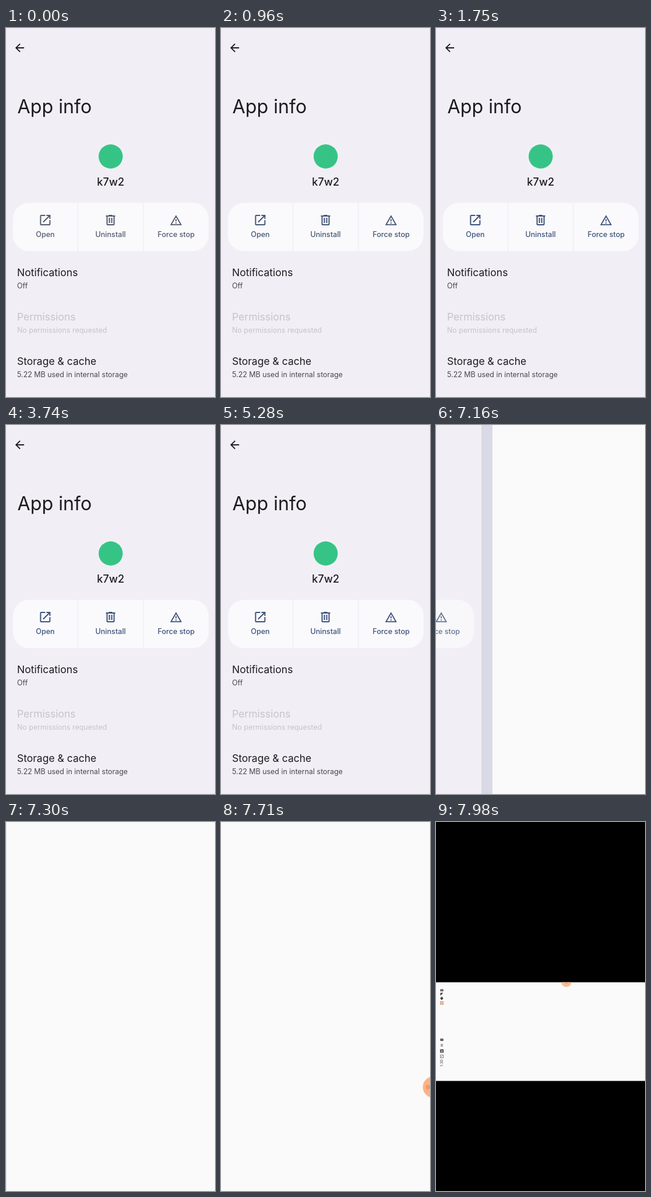
An HTML page for the animation above (8 s loop, 359x632 px).

```html
<!DOCTYPE html>
<html lang="en">
<head>
<meta charset="utf-8">
<title>App info</title>
<style>
  html, body { margin: 0; width: 100%; height: 100%; overflow: hidden; background: #f1eff5; }
  svg { display: block; width: 359px; height: 632px; font-family: Inter, Roboto, sans-serif; }
  .row { font-size: 17.5px; fill: #1b1b20; }
  .note { font-size: 12.45px; fill: #48484e; }
  .off { fill: #c5c4ca; }
  .button { font-size: 12.6px; font-weight: 500; text-anchor: middle; }
</style>
</head>
<body>
<svg viewBox="0 0 359 632">
  <g id="portrait">
    <rect width="359" height="632" fill="#f1eff5"/>
    <g id="page">
      <path transform="translate(12.1 22.6) scale(.95)" fill="#1b1b20"
        d="M20 11H7.83l5.59-5.59L12 4l-8 8 8 8 1.41-1.41L7.83 13H20z"/>
      <text x="19.5" y="146" font-size="32.2" fill="#1b1b20">App info</text>
      <circle cx="179.8" cy="220" r="20.7" fill="#36c486"/>
      <text x="179.8" y="270" font-size="18.2" font-weight="500" text-anchor="middle" fill="#1b1b20">k7w2</text>

      <rect x="12" y="299.5" width="336" height="82.5" rx="27" fill="#fafafc"/>
      <path d="M123.5 299v84M236 299v84" stroke="#f1eff5" stroke-width="1.6"/>
      <g id="actions">
        <path transform="translate(55.4 317)"
          d="M19 19H5V5h7V3H5a2 2 0 0 0-2 2v14a2 2 0 0 0 2 2h14a2 2 0 0 0 2-2v-7h-2zM14 3v2h3.59l-9.83 9.83 1.41 1.41L19 6.41V10h2V3z"/>
        <path transform="translate(167.6 317)" fill-rule="evenodd"
          d="M9 3h6v1h5v2h-1v13a2 2 0 0 1-2 2H7a2 2 0 0 1-2-2V6H4V4h5zM7 6v13h10V6zM9 8h2v9H9zM13 8h2v9h-2z"/>
        <path transform="translate(281 318.4) scale(.92)" fill-rule="evenodd"
          d="M12 2 1 21h22zM12 5.99 19.53 19H4.47zM11 16h2v2h-2zM11 10h2v4h-2z"/>
        <text class="button" x="67.5" y="358">Open</text>
        <text class="button" x="179.6" y="358">Uninstall</text>
        <text class="button" x="292.3" y="358">Force stop</text>
      </g>

      <text class="row" x="19" y="425">Notifications</text>
      <text class="note" x="19" y="445.5">Off</text>
      <text class="row off" x="19" y="501">Permissions</text>
      <text class="note off" x="19" y="522">No permissions requested</text>
      <text class="row" x="19" y="577.3">Storage &amp; cache</text>
      <text class="note" x="19" y="598.4">5.22 MB used in internal storage</text>
    </g>
    <circle id="touch" cx="75" cy="343" r="8" fill="#55555f"/>
    <g id="panel">
      <rect x="361" width="19" height="632" fill="#dadae6"/>
      <rect x="380" width="380" height="632" fill="#fafafa"/>
    </g>
    <g id="bubble">
      <circle r="19" fill="#fde3d1"/>
      <circle r="18" fill="#fdb382"/>
      <circle cx="-9.5" r="3.7" fill="#e99a70"/>
    </g>
  </g>

  <g id="rotated">
    <rect width="359" height="632"/>
    <rect y="274.5" width="359" height="169" fill="#fafafa"/>
    <path d="M215.5 274.5a8.5 8 0 0 0 17 0z" fill="#f8bd98"/>
    <circle cx="224" cy="276" r="1.5" fill="#e99a70"/>
    <g fill="#3c3c3c">
      <path d="M7.5 286.5h5v3.5h-5zM7.5 297.5v-5h5zM7 302l3-3 2.5 3-2.5 3z"/>
      <path d="M7.5 371h5v4h-5zM8 380.5h4v1H8zM8 383h4v1H8zM7 389.5h6v5.5H7z"/>
      <path d="M9 372.5h2v1H9zM8.5 391h1v3h-1zM10.5 391h1v3h-1zM9 288h2v1H9z" fill="#fafafa"/>
      <path d="M7.5 399h5v5h-5zM8.5 403l3-3" fill="none" stroke="#666" stroke-width=".8"/>
      <path d="M7.5 307.5h5v5h-5zM9 310h2" fill="#f4cdb4" stroke="#b9845f" stroke-width=".8"/>
      <text transform="translate(12.3 418.7) rotate(-90)" font-size="6">1:30</text>
    </g>
  </g>
</svg>
<script>
const LOOP = 8000, SLIDE_START = 7052, SLIDE_TIME = 450, SLIDE_WIDTH = 380;
const $ = id => document.getElementById(id);
const clamp = u => Math.min(1, Math.max(0, u));
const ramp = (t, from, to) => clamp((t - from) / (to - from));
const mix = (a, b, u) => a + (b - a) * u;

// Slow pull, fast swing, long settle.
function emphasized(u) {
  const knee = 1 / 6;
  return u < knee ? 0.4 * (u / knee) ** 3 : 1 - 0.6 * (1 - (u - knee) / (1 - knee)) ** 9;
}

const grey = [82, 91, 110], blue = [63, 82, 124];

function draw(t) {
  const tint = ramp(t, 500, 1290);
  $('actions').setAttribute('fill', `rgb(${grey.map((c, i) => Math.round(mix(c, blue[i], tint)))})`);

  const slide = emphasized(ramp(t, SLIDE_START, SLIDE_START + SLIDE_TIME));
  const shift = `translate(${-SLIDE_WIDTH * slide})`;
  $('page').setAttribute('transform', shift);
  $('page').setAttribute('opacity', 1 - 0.3 * slide);
  $('panel').setAttribute('transform', shift);
  $('touch').setAttribute('opacity', 0.17 * ramp(t, 6950, 7010) * (1 - ramp(t, 7060, 7130)));

  const enter = 1 - (1 - ramp(t, 7600, 7710)) ** 2;
  $('bubble').setAttribute('transform', `translate(${mix(385, 365, enter)} 454)`);
  $('rotated').setAttribute('visibility', t >= 7950 ? 'visible' : 'hidden');
}

const start = performance.now();
function tick() {
  draw((performance.now() - start) % LOOP);
  requestAnimationFrame(tick);
}
tick();
</script>
</body>
</html>
```
